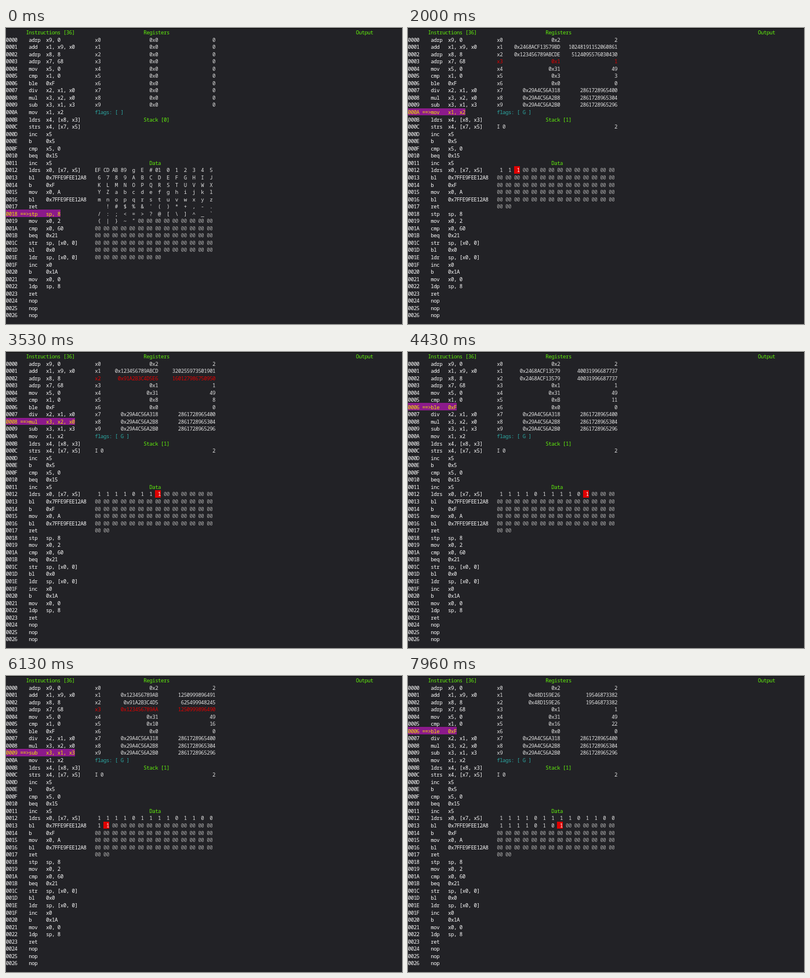
An HTML page with a canvas for the animation above (8000 ms loop, 683 by 512 pixels).

```html
<!DOCTYPE html>
<html lang="en">
<head>
<meta charset="utf-8">
<title>Register machine trace</title>
<style>
html, body { margin: 0; width: 100%; height: 100%; overflow: hidden; background: #222226; }
canvas { display: block; width: 683px; height: 512px; }
</style>
</head>
<body>
<canvas id="screen"></canvas>
<script>
const W = 683, H = 512, LOOP = 8000;
const COL = W / 138, ROW = 12.55, TOP = 13.6, BASELINE = 9.9;
const C = {
  bg: '#222226', edge: '#0c0c0c', white: '#ffffff', text: '#e2e2e2', dim: '#a8a8a8',
  green: '#61f00c', teal: '#2ca9a4', red: '#e00000', bar: '#8b1a8b', arrow: '#f2e600'
};

const listing = `adrp x9, 0|add x1, x9, x0|adrp x8, 8|adrp x7, 68|mov x5, 0|cmp x1, 0|ble 0xF
div x2, x1, x0|mul x3, x2, x0|sub x3, x1, x3|mov x1, x2|ldrs x4, [x8, x3]|strs x4, [x7, x5]
inc x5|b 0x5|cmp x5, 0|beq 0x15|inc x5|ldrs x0, [x7, x5]|bl 0x7FFE9FEE12A8|b 0xF|mov x0, A
bl 0x7FFE9FEE12A8|ret|stp sp, 8|mov x0, 2|cmp x0, 60|beq 0x21|str sp, [x0, 0]|bl 0x0
ldr sp, [x0, 0]|inc x0|b 0x1A|mov x0, 0|ldp sp, 8|ret|nop|nop|nop`
  .split(/[|\n]/).map(line => {
    const [name, ...args] = line.split(' ');
    return name.padEnd(6) + args.join(' ');
  });

const HEAP = 0x29A4C56A2B0n, DIGITS = 8, OUT = 0x68, MEM_SIZE = 176;
const NUMBER = 0x0123456789ABCDEFn;

function initialMemory() {
  const mem = new Uint8Array(MEM_SIZE);
  for (let i = 0; i < 8; i++) mem[i] = Number(NUMBER >> BigInt(8 * i) & 255n);
  const span = (a, b) => {
    let s = '';
    for (let c = a.charCodeAt(0); c <= b.charCodeAt(0); c++) s += String.fromCharCode(c);
    return s;
  };
  const chars = span('0', '9') + span('A', 'Z') + span('a', 'z') + ' !' +
    span('#', '/') + span(':', '@') + span('[', '`') + span('{', '~') + '"';
  [...chars].forEach((ch, i) => { mem[DIGITS + i] = ch.charCodeAt(0); });
  return mem;
}

// Runs the program and keeps a snapshot before every instruction.
function trace(count) {
  const x = Array(10).fill(0n), mem = initialMemory(), states = [];
  let pc = 0x18, flag = '', stack = [], base = 0, hot = -1, red = -1;
  const set = (r, v) => { x[r] = v; red = r; };
  const compare = (a, b) => { flag = a > b ? 'G' : a < b ? 'L' : 'E'; };
  const ops = {
    0x00: () => set(9, HEAP),
    0x01: () => set(1, NUMBER),
    0x02: () => set(8, HEAP + BigInt(DIGITS)),
    0x03: () => set(7, HEAP + BigInt(OUT)),
    0x04: () => set(5, 0n),
    0x05: () => compare(x[1], 0n),
    0x07: () => set(2, x[1] / x[0]),
    0x08: () => set(3, x[2] * x[0]),
    0x09: () => set(3, x[1] - x[3]),
    0x0A: () => set(1, x[2]),
    0x0B: () => set(4, BigInt(mem[DIGITS + Number(x[3])])),
    0x0C: () => { mem[OUT + Number(x[5])] = Number(x[4]); },
    0x0D: () => set(5, x[5] + 1n),
    0x0E: () => { pc = 0x05; },
    0x18: () => { stack = [0n]; },
    0x19: () => set(0, 2n),
    0x1A: () => compare(x[0], 0x60n),
    0x1C: () => { stack = [x[0]]; },
    0x1D: () => { pc = 0x00; }
  };
  while (states.length < count) {
    if (pc === 0x0B) { base = DIGITS; hot = base + Number(x[3]); }
    if (pc === 0x0C) { base = OUT; hot = base + Number(x[5]); }
    states.push({ pc, x: [...x], mem: mem.slice(), flag, stack, base, hot, red });
    const op = ops[pc++];
    red = -1;
    if (op) op();
  }
  return states;
}

// Screen refreshes: [tick, step, refreshes]; each refresh is two ticks and two steps.
const runs = [
  [0, 1, 10], [20, 22, 1], [24, 26, 12], [49, 52, 8], [66, 69, 5], [75, 78, 12],
  [100, 103, 7], [114, 118, 6], [125, 129, 1], [128, 132, 6], [141, 146, 1],
  [144, 149, 1], [147, 153, 2], [153, 159, 10], [173, 180, 7], [187, 195, 2],
  [193, 201, 14], [222, 230, 2]
];

function stepAt(ms) {
  const tick = Math.ceil((Math.floor(ms / 10) * 10 - 490) * 3 / 100) - 1;
  if (tick < 0) return 0;
  const [start, step, n] = runs.filter(run => run[0] <= tick).pop();
  return step + 2 * Math.min(n - 1, Math.floor((tick - start) / 2));
}

const canvas = document.getElementById('screen');
const ctx = canvas.getContext('2d');
const dpr = window.devicePixelRatio || 1;
canvas.width = Math.round(W * dpr);
canvas.height = Math.round(H * dpr);
ctx.scale(dpr, dpr);
ctx.font = '500 9px "Noto Sans Mono", "DejaVu Sans Mono", monospace';
ctx.textAlign = 'center';

function put(text, col, row, color) {
  ctx.fillStyle = color;
  const y = TOP + row * ROW + BASELINE;
  for (let i = 0; i < text.length; i++) {
    if (text[i] !== ' ') ctx.fillText(text[i], (col + i + 0.5) * COL, y);
  }
}

function putRight(text, end, row, color) {
  put(text, end - text.length, row, color);
}

function fillCells(col, row, n, color) {
  const left = Math.round(col * COL), right = Math.round((col + n) * COL);
  const top = Math.floor(TOP + row * ROW), bottom = Math.floor(TOP + (row + 1) * ROW);
  ctx.fillStyle = color;
  ctx.fillRect(left, top, right - left, bottom - top);
}

const hex = (v, width = 0) => v.toString(16).toUpperCase().padStart(width, '0');

function drawListing(pc) {
  listing.forEach((line, i) => {
    const here = i === pc;
    const text = hex(i, 4) + (here ? ' ==>' : '    ') + line;
    if (here) fillCells(0, i, text.trimEnd().length, C.bar);
    put(text, 0, i, here ? C.arrow : C.white);
  });
}

function drawRegisters(s) {
  s.x.forEach((v, i) => {
    const color = i === s.red ? C.red : C.text;
    put('x' + i, 31, i, color);
    putRight('0x' + hex(v), 53, i, color);
    putRight(String(v), 73, i, color);
  });
  put(s.flag ? `flags: [ ${s.flag} ]` : 'flags: [ ]', 31, 10, C.teal);
}

function drawStack(stack) {
  put(`Stack [${stack.length}]`, 48, 11, C.green);
  stack.forEach((v, i) => {
    put('I ' + i, 31, 12 + i, C.text);
    putRight(String(v), 73, 12 + i, C.text);
  });
}

function drawData(s) {
  for (let a = s.base; a < MEM_SIZE; a++) {
    const i = a - s.base, col = 31 + 3 * (i % 14), row = 18 + Math.floor(i / 14);
    const b = s.mem[a], hot = a === s.hot;
    if (hot) fillCells(col, row, 2, C.red);
    const text = b >= 32 && b < 127 ? ' ' + String.fromCharCode(b) : hex(b, 2);
    put(text, col, row, hot ? C.white : b ? C.text : C.dim);
  }
}

function draw(s) {
  ctx.fillStyle = C.bg;
  ctx.fillRect(0, 0, W, H);
  ctx.fillStyle = C.edge;
  ctx.fillRect(0, 0, W, 1);
  put('Instructions [36]', 7, -1, C.green);
  put('Registers', 48, -1, C.green);
  put('Output', 122, -1, C.green);
  put('Data', 50, 17, C.green);
  drawListing(s.pc);
  drawRegisters(s);
  drawStack(s.stack);
  drawData(s);
}

const states = trace(233);
const began = performance.now();
let shown = -1;

function tick() {
  const step = stepAt((performance.now() - began) % LOOP);
  if (step !== shown) draw(states[shown = step]);
  requestAnimationFrame(tick);
}
tick();
</script>
</body>
</html>
```
